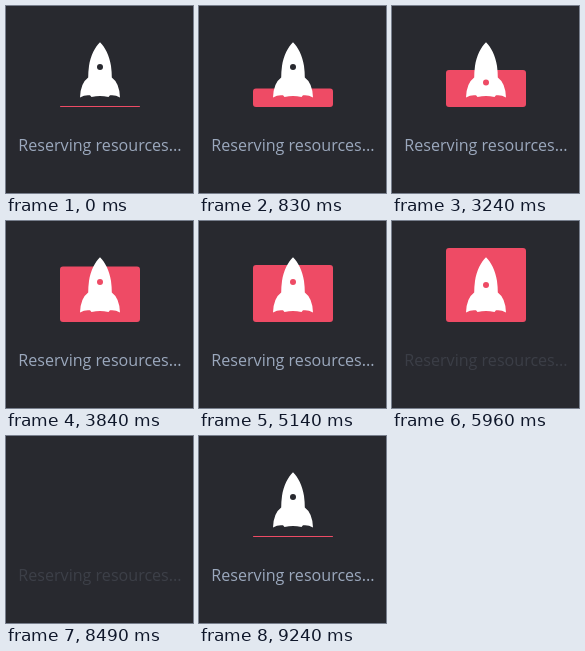
Write an HTML page that moves like this. It is 187x187 px and loops after 9340 ms.

```html
<!DOCTYPE html>
<html lang="en">
<head>
<meta charset="utf-8">
<title>Loading</title>
<style>
  html, body { margin: 0; height: 100%; overflow: hidden; background: #28292f; }
  svg { display: block; width: 100vw; height: 100vh; }
  text { font: 16.1px "Open Sans", sans-serif; fill: #9ba8bd; text-anchor: middle; }
</style>
</head>
<body>
<svg viewBox="0 0 187 187">
  <clipPath id="window"><rect x="54" y="27" width="80" height="74"/></clipPath>
  <mask id="porthole" maskUnits="userSpaceOnUse" x="54" y="27" width="80" height="74">
    <rect x="54" y="27" width="80" height="74" fill="#fff"/>
    <circle id="dot" cx="94" cy="61" r="3"/>
  </mask>
  <g clip-path="url(#window)">
    <g id="badge">
      <rect id="bar" x="54" width="80" fill="#ee4b65"/>
      <path mask="url(#porthole)" fill="#fff" d="M94 36.3
        C99 41 103.5 50 105 60 Q105.8 66 105.8 71.5
        Q113.5 77 114 91.5 Q109 88.5 104 89.3 L102.5 91
        Q98 90 94 90 Q90 90 85.5 91
        L84 89.3 Q79 88.5 74 91.5 Q74.5 77 82.2 71.5
        Q82.2 66 83 60 C84.5 50 89 41 94 36.3Z"/>
    </g>
  </g>
  <text id="label" x="94" y="145">Reserving resources...</text>
</svg>
<script>
  const LOOP = 9340, HEIGHT = 74, BOTTOM = 101;
  const STEP_STARTS = [545, 2065, 3585, 5095];
  const [badge, bar, dot, label] = ["badge", "bar", "dot", "label"].map(id => document.getElementById(id));

  const progress = (t, start, duration) => Math.min(1, Math.max(0, (t - start) / duration));
  const smooth = p => p * p * (3 - 2 * p);
  const cubicOut = p => 1 - (1 - p) ** 3;
  const expoOut = p => p === 1 ? 1 : 1 - 2 ** (-10 * p);

  // The porthole leaves through the nose and comes back in from the tail.
  function portholeY(t) {
    const p = t < 140 || t > 5990 ? 0 : progress((t - 140) % 1300, 0, 650);
    return p < 0.5 ? 61 - 56 * p : 95 - 68 * (p - 0.5);
  }

  function draw(now) {
    const t = now % LOOP;

    const filled = t > 7000 ? 0 : STEP_STARTS.reduce((sum, start) => sum + smooth(progress(t, start, 260)) / 4, 0);
    const height = Math.max(1, HEIGHT * filled);
    bar.setAttribute("y", BOTTOM - height);
    bar.setAttribute("height", height);
    bar.setAttribute("rx", Math.min(3, height / 2));

    dot.setAttribute("cy", portholeY(t));

    const shift = t < 7000 ? -expoOut(progress(t, 5970, 590)) : 1 - expoOut(progress(t, 8620, 610));
    badge.setAttribute("transform", `translate(0 ${shift * HEIGHT})`);

    const fade = 1 - smooth(progress(t, 5640, 430)) + cubicOut(progress(t, 8465, 430));
    label.setAttribute("opacity", fade);

    requestAnimationFrame(() => draw(performance.now() - origin));
  }

  const origin = performance.now();
  draw(0);
</script>
</body>
</html>
```
